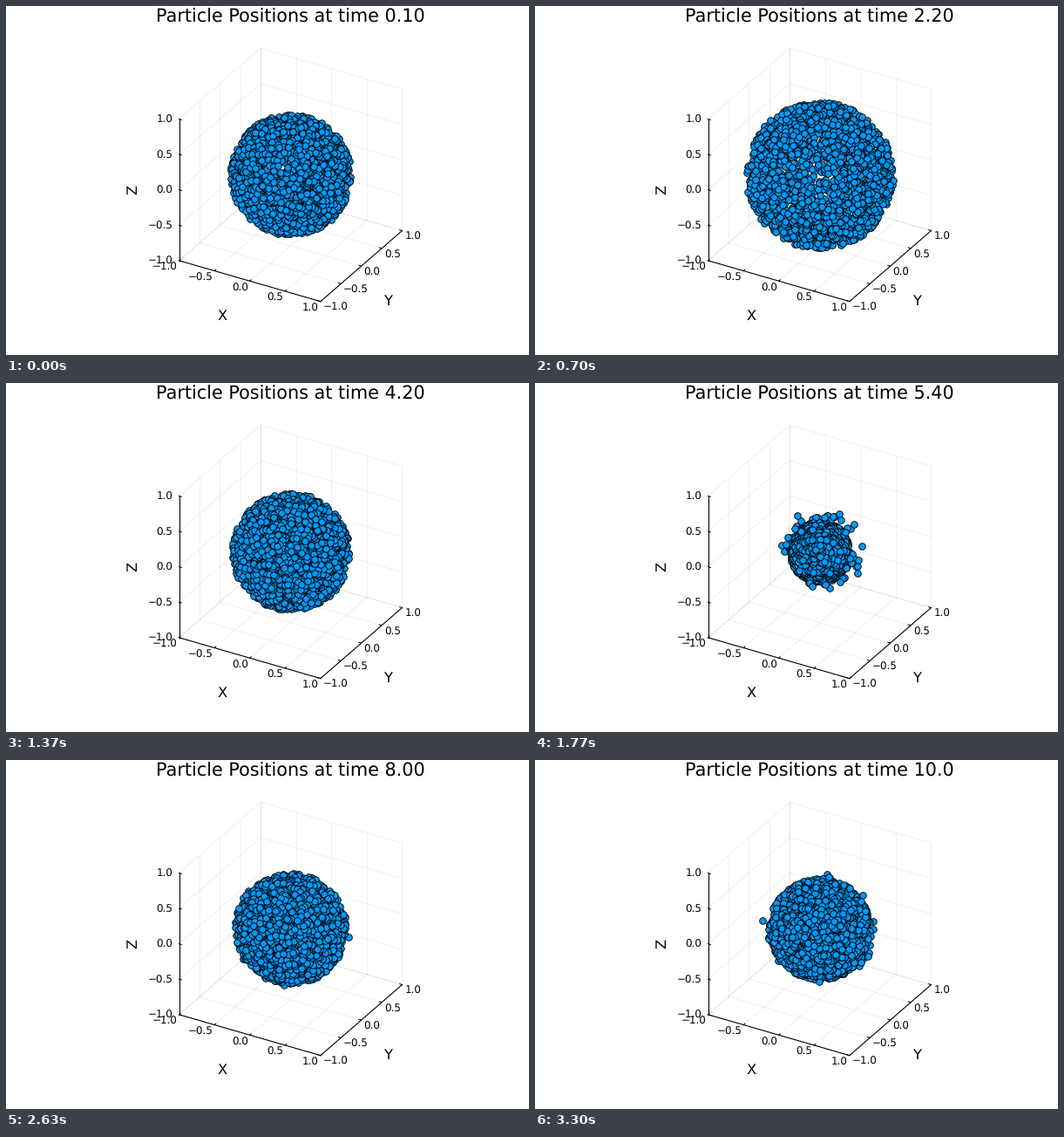
Animation of 600x400 px, one loop 3.33 s. Source, as a matplotlib script:

```python
import numpy as np
import matplotlib.pyplot as plt
from matplotlib.animation import FuncAnimation

plt.rcParams["font.family"] = "DejaVu Sans"
plt.rcParams["text.hinting"] = "none"

W, H, DPI = 600, 400, 100
PX = 72 / DPI  # points per pixel
STEPS, LOOP_MS, TICK_MS = 100, 3330, 10

# Orthographic view: azimuth 30, elevation 30
CENTER = np.array([326.5, 193.5])
SCALE = 93.7
C30, S30 = np.cos(np.pi / 6), 0.5
RIGHT = np.array([C30, S30, 0])
UP = np.array([-S30 * S30, S30 * C30, C30])
TOWARD = np.array([S30 * C30, -C30 * C30, S30])
TICKS = np.linspace(-1, 1, 5)


def project(p):
    p = np.asarray(p, float)
    return CENTER + SCALE * np.stack([p @ RIGHT, -(p @ UP)], axis=-1)


fig = plt.figure(figsize=(W / DPI, H / DPI), dpi=DPI, facecolor="white")
ax = fig.add_axes([0, 0, 1, 1])
ax.set_xlim(0, W)
ax.set_ylim(H, 0)
ax.axis("off")


def segment(a, b, width=1.0, **style):
    x, y = project([a, b]).T
    ax.plot(x, y, lw=width * PX, color="black", **style)


def label(x, y, text, size, **style):
    return ax.text(x, y, text, fontsize=size * PX, color="black", **style)


def tick_text(v):
    return f"{v:.1f}".replace("-", "\u2212")


def draw_grid():
    grid = dict(width=0.8, alpha=0.07, zorder=1)
    for v in TICKS:
        segment((v, -1, -1), (v, 1, -1), **grid)
        segment((v, 1, -1), (v, 1, 1), **grid)
        segment((-1, v, -1), (1, v, -1), **grid)
        segment((-1, v, -1), (-1, v, 1), **grid)
        segment((-1, -1, v), (-1, 1, v), **grid)
        segment((-1, 1, v), (1, 1, v), **grid)


def draw_axes():
    edge = dict(width=1.1, zorder=2, solid_capstyle="projecting")
    segment((-1, -1, -1), (1, -1, -1), **edge)
    segment((1, -1, -1), (1, 1, -1), **edge)
    segment((-1, -1, -1), (-1, -1, 1), **edge)
    d = 0.035
    for v in TICKS:
        spots = [(v, -1, -1), (1, v, -1), (-1, -1, v)]
        ends = [(v, -1 + d, -1), (1 - d, v, -1), (-1 + d, -1, v)]
        for a, b in zip(spots, ends):
            segment(a, b, zorder=2)
        (xx, xy), (yx, yy), (zx, zy) = project(spots)
        text = tick_text(v)
        label(xx - 1.8, xy + 11.2, text, 11.9, ha="right")
        label(yx + 3.0, yy + 10.6, text, 11.9, ha="left")
        label(zx - 7.0, zy + 4.5, text, 11.9, ha="right")
    label(248.2, 360.3, "X", 16.3, ha="center")
    label(437.6, 342.8, "Y", 16.3, ha="center")
    label(145.4, 210, "Z", 16.3, ha="center", va="center", rotation=90)


# Particles: a ball that falls through its centre again and again
COUNT, STRAY = 3000, 160
CORE = 0.30
TURNS = [0, 1.17, 3.15, 5.24, 7.18, 9.32, 11.47]
PHASES = np.pi * np.array([0, 0.5, 1.5, 2.5, 3.5, 4.5, 5.5])
REACH = [0.68, 0.85, 0.65, 0.85, 0.65, 0.65]

rng = np.random.default_rng(7)


def unit(v):
    return v / np.linalg.norm(v, axis=1, keepdims=True) if False else \
        v / np.sqrt((v * v).sum(axis=1))[:, None]


start = unit(rng.normal(size=(COUNT, 3)))
side = unit(rng.normal(size=(COUNT, 3)))
depth = rng.random(COUNT) ** 0.2
depth[:STRAY] = 1
extra = np.zeros(COUNT)
extra[:STRAY] = 0.2 * rng.random(STRAY) ** 3


def positions(t):
    phase = np.interp(t, TURNS, PHASES)
    swing = np.cos(phase)
    reach = REACH[int(phase / np.pi + 0.5)] * swing
    edge = np.hypot(reach, CORE)
    heading = unit(start * reach + side * CORE * np.sin(phase))
    spread = extra * min(t / 6, 1) * (1 - swing ** 4)
    p = heading * (depth * edge + spread)[:, None]
    near = p @ TOWARD
    order = np.argsort(near)
    # the far side is hidden behind the front
    return p[order[near[order] > -0.4 * edge]]


draw_grid()
draw_axes()
title = label(326, 18.3, "", 20.8, ha="center")
dots, = ax.plot([], [], "o", ms=7.6 * PX, mew=0.9 * PX, mfc="#009afa",
                mec="black", zorder=5)


def update(tick):
    # each step starts on the nearest 10 ms tick
    step = int((tick + 0.5) * TICK_MS * STEPS / LOOP_MS)
    t = (min(step, STEPS - 1) + 1) / 10
    dots.set_data(*project(positions(t)).T)
    title.set_text("Particle Positions at time " + f"{t:.2f}"[:4])
    return dots, title


anim = FuncAnimation(fig, update, frames=LOOP_MS // TICK_MS,
                     interval=TICK_MS, repeat=True, repeat_delay=0, blit=False)
plt.show()
```
